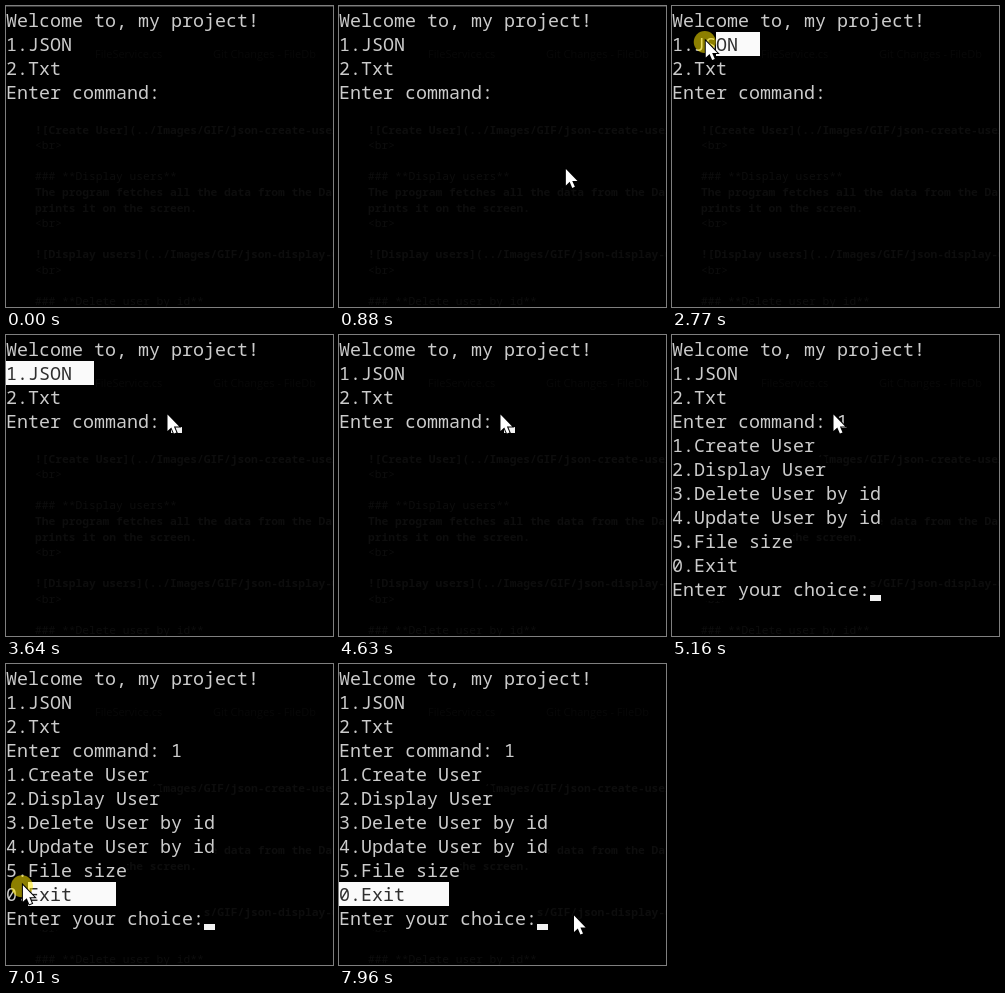
Recreate the animation shown at these times as an HTML page. Size 327 by 301 pixels, loop 8000 ms.

```html
<!DOCTYPE html>
<html lang="en">
<head>
<meta charset="utf-8">
<title>Console menu</title>
<style>
html, body { margin: 0; width: 100%; height: 100%; overflow: hidden; background: #000; }
svg { display: block; width: 327px; height: 301px; }
text { white-space: pre; font: 18.333px "Noto Sans Mono", "DejaVu Sans Mono", monospace; }
#ghost text { font-size: 11.25px; fill: #0d0d0d; }
#ghost .bold { font-weight: 700; }
#ghost .tab { font: 11px "Open Sans", sans-serif; fill: #080808; }
#rows { fill: #ccc; }
#picked { fill: #2e2e2e; }
#mouse { fill: #fff; stroke: #000; stroke-width: 2; paint-order: stroke; }
</style>
</head>
<body>
<svg viewBox="0 0 327 301">
  <defs><clipPath id="clip"><rect id="clipBox" height="24"/></clipPath></defs>
  <rect width="327" height="301"/>
  <rect id="edge" width="327" height="1" fill="#383838"/>
  <g id="ghost">
    <text class="tab" x="89" y="52">FileService.cs</text>
    <text class="tab" x="207" y="52">Git Changes - FileDb</text>
  </g>
  <g id="covers"></g>
  <g id="rows"></g>
  <rect id="caret" width="11" height="6" fill="#f2f2f2"/>
  <g id="picked" clip-path="url(#clip)">
    <rect width="327" height="301" fill="#fafafa"/>
    <text id="pickedText" x="0"></text>
  </g>
  <circle id="press" r="11" fill="#ffe800" opacity=".55"/>
  <path id="mouse" d="M0 0V16.5L3.8 12.9L6.4 19L9 17.9L6.4 12H11.6Z"/>
</svg>
<script>
const LOOP = 8000, CELL = 11, ROW = 24, BLINK = 530;
const FOCUS = 1420, READY = 3290, TYPED = 4760, MENU = 5160;
const MENU_ROW = 4;
const NS = "http://www.w3.org/2000/svg";
const $ = id => document.getElementById(id);

function set(el, attrs) {
  for (const key in attrs) el.setAttribute(key, attrs[key]);
}
function add(parent, tag, attrs, label = "") {
  const el = document.createElementNS(NS, tag);
  set(el, attrs);
  el.textContent = label;
  return $(parent).appendChild(el);
}
const show = (el, on) => set(el, { visibility: on ? "visible" : "hidden" });
const rowTop = row => 2 + row * ROW;

// Dim document showing through the translucent console
[
  "![Create User](../Images/GIF/json-create-user.gif)",
  "<br>",
  "",
  "### **Display users**",
  "The program fetches all the data from the Database and",
  "prints it on the screen.",
  "<br>",
  "",
  "![Display users](../Images/GIF/json-display-users.gif)",
  "<br>",
  "",
  "### **Delete user by id**"
].forEach((label, i) => {
  const weight = /^[!Tp]/.test(label) ? "bold" : "";
  add("ghost", "text", { x: 29, y: 127.5 + i * 15.6, class: weight }, label);
});

const lines = [
  "Welcome to, my project!", "1.JSON", "2.Txt", "Enter command: ",
  "1.Create User", "2.Display User", "3.Delete User by id",
  "4.Update User by id", "5.File size", "0.Exit", "Enter your choice:"
];
const rows = lines.map((label, i) => {
  if (i >= MENU_ROW)
    add("covers", "rect", { y: rowTop(i), width: label.length * CELL, height: ROW });
  return add("rows", "text", { x: 0, y: rowTop(i) + 19 }, label);
});

// Each move leaves from where the last one ended
const moves = [
  { start: 330, end: 600, to: [228, 171] },
  { start: 810, end: 1020, to: [218, 100] },
  { start: FOCUS, end: 2230, to: [84, 35] },
  { start: 2230, end: 2970, to: [-10, 35], pick: { row: 1, cells: 8, until: 3970 } },
  { start: 3040, end: 3150, to: [-30, 40] },
  { start: READY, end: 3640, to: [161.5, 79.5] },
  { start: 5890, end: 6030, to: [118, 233] },
  { start: 6170, end: 6250, to: [105, 218] },
  { start: 6250, end: 6530, to: [102, 220] },
  { start: 6730, end: 7080, to: [-30, 222], pick: { row: 9, cells: 10, until: LOOP } },
  { start: 7540, end: 7960, to: [235, 251.5] }
];

function pointer(t) {
  let at = [299, 303];
  for (const { start, end, to } of moves) {
    if (t < start) break;
    const f = Math.min(1, (t - start) / (end - start)) ** 2;
    at = at.map((from, k) => from + (to[k] - from) * f);
  }
  return at;
}

function caretOn(t) {
  const justChanged = [TYPED, MENU].some(at => t >= at && t < at + BLINK);
  return t >= READY && (justChanged || Math.floor((t - 380) / BLINK) % 2 === 0);
}

function drawSelection(t, x) {
  const drag = moves.find(m => m.pick && t >= m.start && t < m.pick.until);
  show($("picked"), drag);
  show($("press"), drag && t < drag.end + 150);
  if (!drag) return;
  const { row, cells } = drag.pick;
  const first = t < drag.end ? Math.min(cells, Math.max(0, Math.ceil(x / CELL))) : 0;
  set($("clipBox"), { x: first * CELL, y: rowTop(row), width: (cells - first) * CELL });
  set($("pickedText"), { y: rowTop(row) + 19 });
  $("pickedText").textContent = lines[row];
}

function draw(t) {
  const [x, y] = pointer(t);
  const menu = t >= MENU, typed = t >= TYPED;
  show($("edge"), t < FOCUS);
  rows[3].textContent = lines[3] + (typed ? "1" : "");
  rows.forEach((row, i) => show(row, i < MENU_ROW || menu));
  show($("covers"), menu);

  const row = menu ? 10 : 3;
  set($("caret"), { x: rows[row].textContent.length * CELL, y: rowTop(row) + 18 });
  show($("caret"), caretOn(t));

  drawSelection(t, x);
  set($("press"), { cx: x - 1, cy: y + 1 });
  set($("mouse"), { transform: `translate(${x} ${y})` });
}

function tick() {
  draw(performance.now() % LOOP);
  requestAnimationFrame(tick);
}
tick();
</script>
</body>
</html>
```
